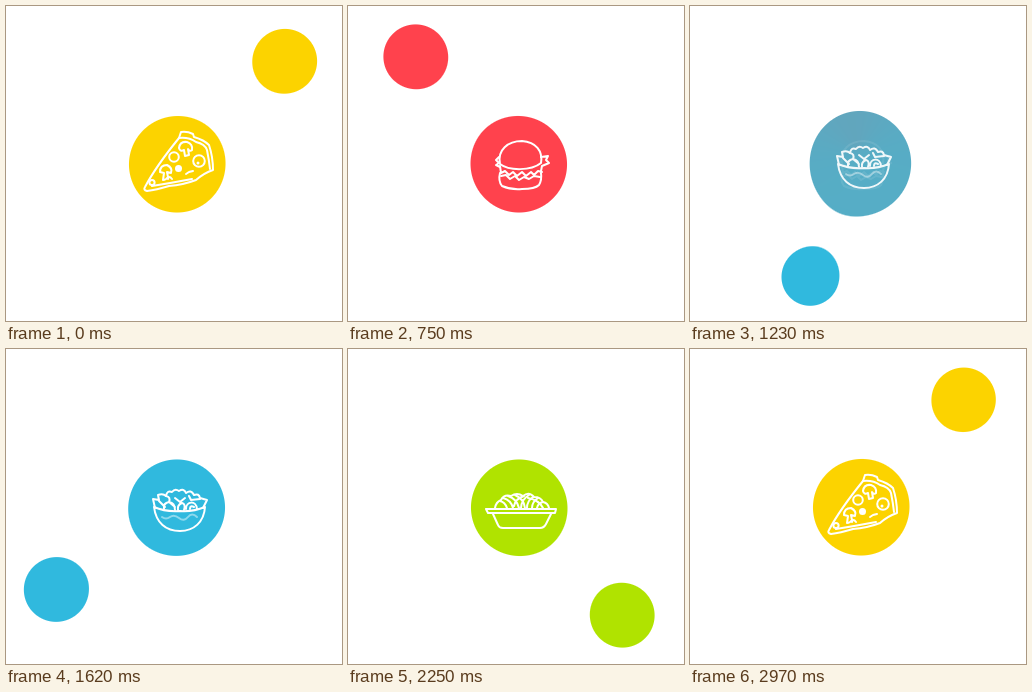
An HTML page with a canvas that plays this animation: 336 by 315 pixels, repeating every 3 s.

```html
<!DOCTYPE html>
<html lang="en">
<head>
<meta charset="utf-8">
<title>Food loader</title>
<style>
  html, body { margin: 0; width: 100%; height: 100%; overflow: hidden; background: #fff; }
  canvas, svg { position: absolute; left: 0; top: 0; width: 336px; height: 315px; }
  g { fill: none; stroke: #fff; stroke-width: 2; stroke-linecap: round; stroke-linejoin: round; }
  .fill { fill: #fff; stroke: none; }
</style>
</head>
<body>
<canvas id="stage" width="336" height="315"></canvas>
<svg viewBox="0 0 336 315">
  <g class="icon">
    <path d="M139 181C148 164 160 148 173 132L175 126Q181 125 187 128L188 131Q198 134 203 139Q207 151 207 164Q198 167 190 174Q177 179 163 180Q150 184 141 185Q137 184 139 181Z"/>
    <path d="M173 132Q183 131 190 136Q199 138 201 144Q203 154 204 163M146 180Q165 177 186 173"/>
    <circle cx="168" cy="151" r="4.8"/>
    <circle cx="193" cy="155" r="5.8"/>
    <circle cx="172.500" cy="162.500" r="3.500" class="fill"/>
    <circle cx="192" cy="157" r="1.500" class="fill"/>
    <circle cx="146" cy="176.500" r="2.600"/>
    <path d="M173 142Q174 135 181 136Q187 138 186 144Q184 146 182 143L183 149L179 150L178 144Q174 146 173 142Z"/>
    <path d="M154 166Q154 159 161 159Q167 162 165 167L161 166L162 171Q160 174 157 174L158 167ZM162 173Q163 169 166 173M180 168L183 166L187 165"/>
  </g>
  <g class="icon">
    <path d="M152 158C149 144 160 135 174 135C188 136 195 145 193 157C183 165 161 165 152 158Z"/>
    <path d="M151 151L148 154L151 157L148 159L152 161M193 151L200 150L198 154L201 157L194 160L193 165"/>
    <path d="M152 160L153 167L157 165L161 169L165 166L169 170L174 166L178 170L183 166L186 169L190 165L194 166"/>
    <path d="M153 170L158 169L162 173L167 170L171 174L176 171L181 173L186 170L192 171"/>
    <path d="M152 167Q150 175 154 180Q163 184 174 183Q187 183 191 179Q194 174 193 167"/>
  </g>
  <g class="icon">
    <path d="M148 158C150 174 160 182 174 182C188 182 198 173 199 158Q187 163 174 162Q159 163 148 158Z"/>
    <path d="M149 159L147 150L153 151L152 146Q157 144 160 147Q161 141 166 143Q169 139 173 142Q178 139 180 144Q185 140 188 146Q193 144 194 149L201 151L197 159"/>
    <path d="M153 152L159 158M160 147Q165 148 163 153L169 158M169 149L174 153L179 149M183 147L185 151L194 150M158 160Q157 154 163 153Q169 154 169 161M172 161Q171 156 176 154Q180 155 178 161M180 160C180 152 190 151 191 160M184 160Q184 156 188 158"/>
    <path d="M156 168Q160 171 164 168T173 169T182 168T191 168" opacity=".45"/>
  </g>
  <g class="icon">
    <path d="M138 160H208L207 164H140ZM145 165L150 176Q151 179 155 179H192Q196 179 198 175L203 165"/>
    <path d="M147 159Q148 153 153 151Q156 145 163 147Q169 143 175 147Q181 142 186 148Q193 148 195 153Q200 154 201 159"/>
    <path d="M152 152Q157 153 159 159M155 149Q163 151 165 159M160 147Q169 150 171 159M167 146Q176 150 177 159M176 147Q167 150 166 157M181 146Q173 151 173 159M185 148Q179 152 179 159M190 149Q184 153 184 159M195 153Q190 154 189 159M180 149Q191 151 195 159"/>
  </g>
</svg>
<script>
const W = 336, H = 315, CX = 171, CY = 158.5, CORE = 48;
const LOOP = 3000, QUARTER = 750, STEP = 30;
const SOFT = 23; // reach of the blobs' attraction

const BALLS = [[252, 211, 0], [255, 66, 77], [48, 185, 222], [176, 227, 0]];
const BLENDS = [[255, 165, 76], [160, 150, 150], [110, 198, 110], [210, 215, 0]];

// One petal of the route: time from its apex, x, y, radius.
const PETAL = [
  [-540, 0, 0, -80], [-480, 3, -20, 0], [-420, 10, -46, 22],
  [-360, 25, -79, 25], [-330, 32, -94, 25.5], [-270, 51, -113, 28],
  [-150, 77, -121, 31], [0, 108, -103.5, 32], [150, 122, -76, 32],
  [270, 111, -46, 28.5], [330, 88, -26, 26], [390, 54, -12, 24],
  [420, 37, -8, 22], [480, 18, -4, 0], [540, 0, 0, -80]
];

const ctx = document.getElementById('stage').getContext('2d');
const image = ctx.createImageData(W, H);
const icons = document.querySelectorAll('.icon');
const clamp = v => Math.max(0, Math.min(1, v));
const mix = (a, b, k) => a.map((v, i) => v + (b[i] - v) * k);

function slope(i, n) {
  const a = PETAL[Math.max(0, i - 1)], b = PETAL[Math.min(PETAL.length - 1, i + 1)];
  return (b[n] - a[n]) / (b[0] - a[0]);
}

function petalAt(time) {
  const i = PETAL.findIndex((p, n) => n < PETAL.length - 1 && time < PETAL[n + 1][0]);
  const a = PETAL[i], b = PETAL[i + 1], span = b[0] - a[0];
  const u = (time - a[0]) / span, v = 1 - u;
  const curve = n =>
    v * v * (1 + 2 * u) * a[n] + u * u * (3 - 2 * u) * b[n] +
    span * u * v * (v * slope(i, n) - u * slope(i + 1, n));
  return [curve(1), curve(2), a[3] + (b[3] - a[3]) * u];
}

function blobsAt(t) {
  const quarter = Math.floor(t / QUARTER), next = (quarter + 1) % 4, phase = t % QUARTER;
  const color = phase < 400
    ? mix(BALLS[quarter], BLENDS[quarter], clamp((phase - 300) / 100))
    : mix(BLENDS[quarter], BALLS[next], clamp((phase - 400) / 120));
  const blobs = [{ x: CX, y: CY, r: CORE, color }];
  BALLS.forEach((ballColor, i) => {
    const time = (t - i * QUARTER + LOOP * 1.5) % LOOP - LOOP / 2;
    if (Math.abs(time) >= 540) return;
    let [x, y, r] = petalAt(time);
    for (let n = 0; n < i; n++) [x, y] = [y, -x];
    blobs.push({ x: CX + x, y: CY + y, r, color: ballColor });
  });
  return blobs;
}

function paint(blobs) {
  const data = image.data;
  for (let y = 0, p = 0; y < H; y++) {
    for (let x = 0; x < W; x++, p += 4) {
      let field = 0, weight = 0, red = 0, green = 0, blue = 0;
      for (const b of blobs) {
        const pull = Math.exp((b.r - Math.hypot(x + 0.5 - b.x, y + 0.5 - b.y)) / SOFT);
        const share = pull * pull;
        field += pull;
        weight += share;
        red += share * b.color[0];
        green += share * b.color[1];
        blue += share * b.color[2];
      }
      data[p] = red / weight;
      data[p + 1] = green / weight;
      data[p + 2] = blue / weight;
      data[p + 3] = 255 * clamp(0.5 + SOFT * Math.log(field));
    }
  }
  ctx.putImageData(image, 0, 0);
}

function showIcons(t) {
  const quarter = Math.floor(t / QUARTER);
  const fade = clamp((t % QUARTER - 380) / 110);
  icons.forEach((icon, i) => {
    icon.style.opacity = i === quarter ? 1 - fade : i === (quarter + 1) % 4 ? fade : 0;
  });
}

const start = performance.now();
let shown = -1;
function frame() {
  const elapsed = Math.max(0, performance.now() - start) % LOOP;
  const t = Math.floor(elapsed / STEP) * STEP;
  if (t !== shown) {
    shown = t;
    paint(blobsAt(t));
    showIcons(t);
  }
  requestAnimationFrame(frame);
}
frame();
</script>
</body>
</html>
```
